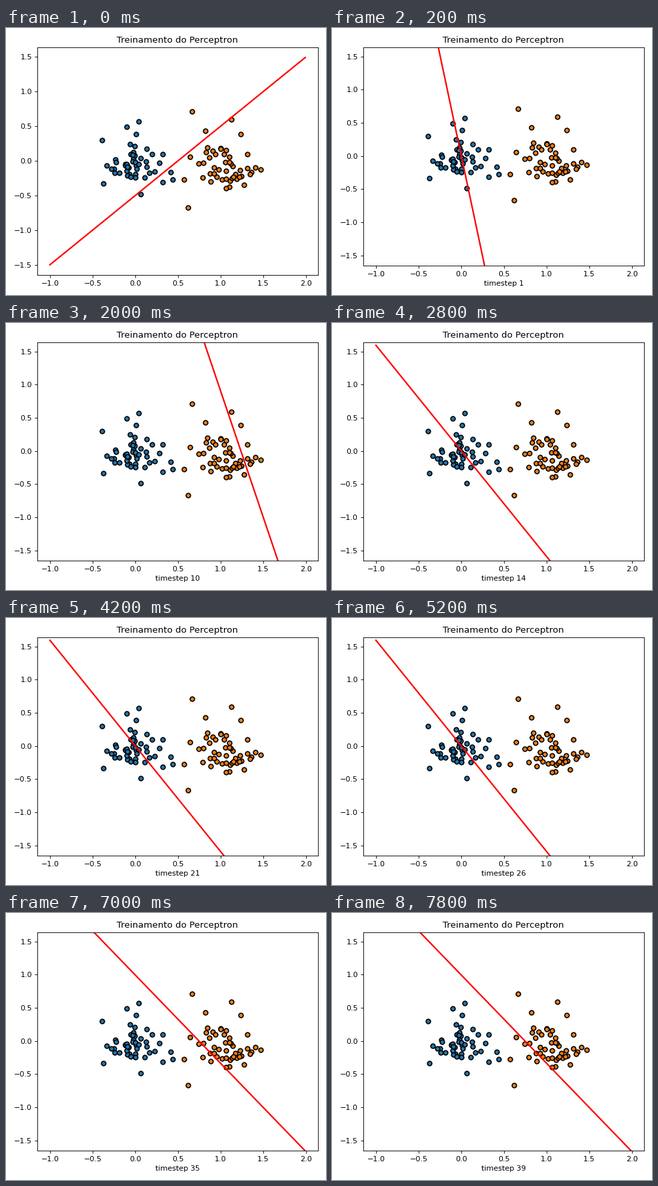
Animation, 480 px wide and 400 px high, one loop 8 s. Source, as a matplotlib script:

```python
import numpy as np
import matplotlib.pyplot as plt
from matplotlib.animation import FuncAnimation

STEPS = 40
INTERVAL = 200
PER_CLASS = 50

# Perceptron weights (bias, x, y) and the corrections made on errors:
# step -> (sign, x, y) of the misclassified sample
START = np.array([0, 1.090, .1795])
FIXES = {8: (-1, .281, -.033), 14: (1, .663, .712), 34: (-1, .131, -.083)}

# Stray samples that give each cloud its outline
RIM_A = [(.04, .57), (-.10, .49), (.01, .385), (-.39, .30), (.32, .095),
         (.41, -.16), (.44, -.275), (.32, -.31), (.06, -.485), (-.375, -.33)]
RIM_B = [(.82, .43), (1.125, .595), (1.23, .385), (1.47, -.13),
         (.62, -.67), (.57, -.27), (.64, .055)]

rng = np.random.default_rng(7)
xs = np.arange(-1, 2, .01)


def cloud(sign, rim, center, spread):
    """Known samples of one class, filled up with a round Gaussian core."""
    used = [fix[1:] for fix in FIXES.values() if fix[0] == sign]
    core = rng.normal(size=(4 * PER_CLASS, 2))
    core = core[np.hypot(*core.T) < 1.9] * spread + center
    return np.vstack([rim, used, core])[:PER_CLASS]


def weights(step):
    w = START.copy()
    for when, (sign, x, y) in FIXES.items():
        if step >= when:
            w += sign * np.array([1, x, y])
    return w


def boundary(step):
    if step == 0:
        return xs - .5
    bias, wx, wy = weights(step)
    return -(wx * xs + bias) / wy


fig, ax = plt.subplots(figsize=(6, 5), dpi=80, layout="tight")
for points, color in (
        (cloud(-1, RIM_A, (-.02, -.03), (.17, .18)), "tab:blue"),
        (cloud(1, RIM_B, (1.07, -.03), (.18, .21)), "tab:orange")):
    ax.scatter(*points.T, s=36, color=color, edgecolors="k", linewidths=1.5)
line, = ax.plot(xs, boundary(0), "r-", linewidth=2)
ax.set_title("Treinamento do Perceptron")
ax.set_xlim(ax.get_xlim())
ax.set_ylim(ax.get_ylim())


def update(step):
    line.set_ydata(boundary(step))
    ax.set_xlabel(f"timestep {step}" if step else "")
    return line,


anim = FuncAnimation(fig, update, frames=STEPS, interval=INTERVAL,
                     init_func=lambda: update(0), repeat=True, repeat_delay=0)
plt.show()
```
